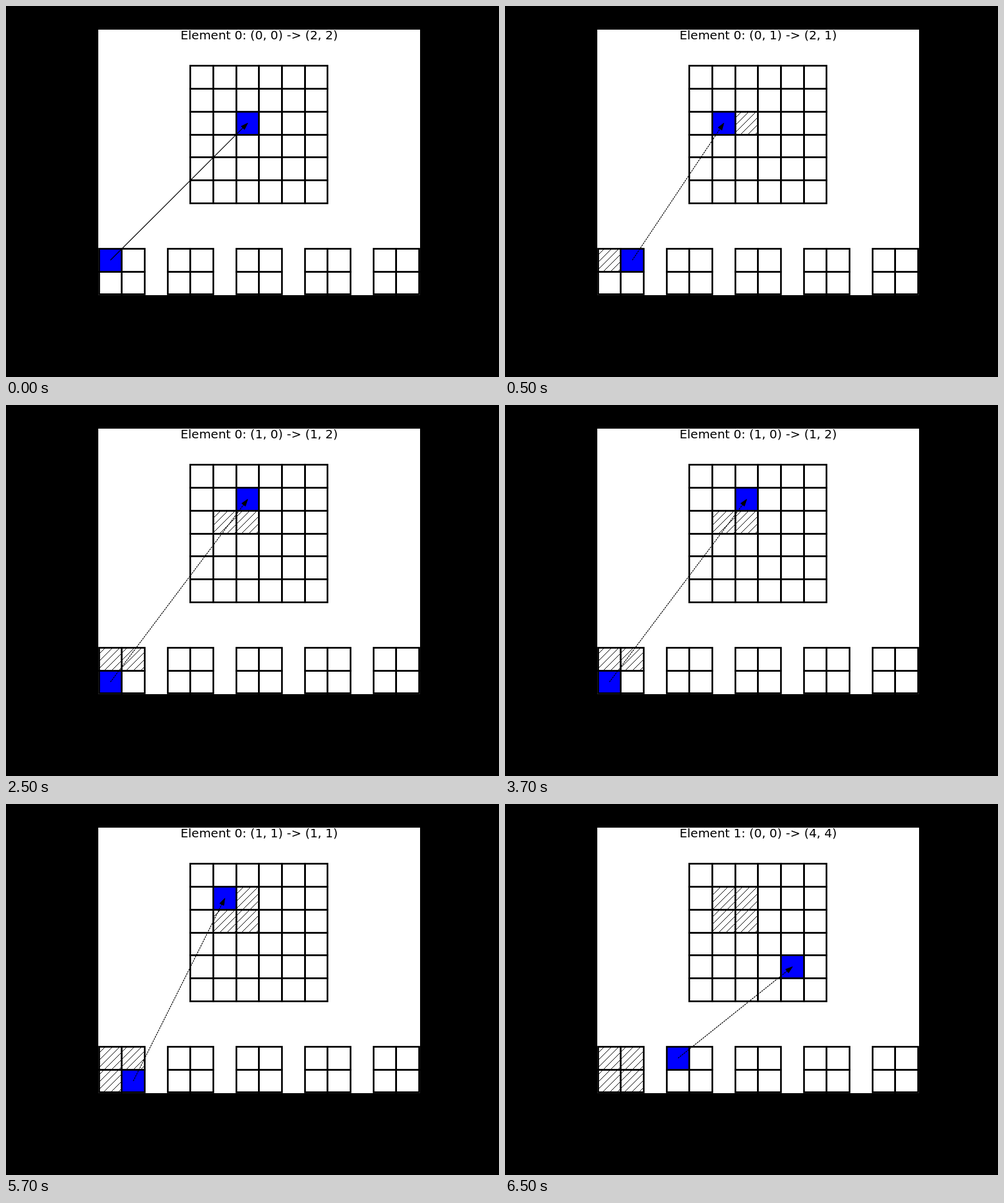
Recreate the animation shown at these times as an HTML page. Size 812 px wide and 612 px high, loop 8000 ms.

```html
<!DOCTYPE html>
<html lang="en">
<head>
<meta charset="utf-8">
<title>Element assembly</title>
<style>
  html, body { margin: 0; width: 100%; height: 100%; overflow: hidden; background: #000; }
  svg { display: block; width: 812px; height: 612px; }
  text { font: 20px "DejaVu Sans", sans-serif; text-anchor: middle; }
</style>
</head>
<body>
<svg viewBox="0 0 812 612">
  <defs>
    <pattern id="hatch" width="12" height="12" patternUnits="userSpaceOnUse">
      <path d="M-3 3L3 -3M-3 15L15 -3M9 15L15 9" stroke="#000" stroke-width="1"/>
    </pattern>
  </defs>
  <rect x="152" y="39" width="530" height="438" fill="#fff"/>
  <g id="cells" stroke="#000" stroke-width="2.78"></g>
  <path id="shaft" fill="none" stroke="#000" stroke-width="1.25"/>
  <path id="head" stroke="#000" stroke-width="1"/>
  <text id="title" x="417" y="55"></text>
</svg>
<script>
const LOOP = 8000, PITCH = 37.68, LEFT = 152.65, TOP = 98.49;
const $ = id => document.getElementById(id);

// Each step moves local cell (row, col) of an element to a global cell.
const steps = [
  { at: 0, el: 0, from: [0, 0], to: [2, 2] },
  { at: 500, el: 0, from: [0, 1], to: [2, 1] },
  { at: 2500, el: 0, from: [1, 0], to: [1, 2] },
  { at: 4500, el: 0, from: [1, 1], to: [1, 1] },
  { at: 6500, el: 1, from: [0, 0], to: [4, 4] }
];

const px = col => LEFT + PITCH * col;
const py = row => TOP + PITCH * row;
const snap = v => Math.round(v) + 0.5;
const cells = {};

function addGrid(row, col, size) {
  for (let r = row; r < row + size; r++) {
    for (let c = col; c < col + size; c++) {
      const x = snap(px(c)), y = snap(py(r));
      const cell = document.createElementNS("http://www.w3.org/2000/svg", "rect");
      cell.setAttribute("x", x);
      cell.setAttribute("y", y);
      cell.setAttribute("width", snap(px(c + 1)) - x);
      cell.setAttribute("height", snap(py(r + 1)) - y);
      $("cells").append(cell);
      cells[[r, c]] = cell;
    }
  }
}

addGrid(0, 4, 6);
for (let i = 0; i < 5; i++) addGrid(8, 3 * i, 2);

const source = s => [8 + s.from[0], 3 * s.el + s.from[1]];
const target = s => [s.to[0], 4 + s.to[1]];
const center = ([r, c]) => [px(c + 0.5) + 0.5, py(r + 0.5) + 0.5];

function paint(step, fill) {
  for (const key of [source(step), target(step)]) cells[key].setAttribute("fill", fill);
}

function drawArrow(step) {
  const [x1, y1] = center(source(step)), [x2, y2] = center(target(step));
  const len = Math.hypot(x2 - x1, y2 - y1);
  const ux = (x2 - x1) / len, uy = (y2 - y1) / len;
  const bx = x2 - ux * 11.3, by = y2 - uy * 11.3, w = 3.8;
  $("shaft").setAttribute("d", `M${x1} ${y1}L${bx} ${by}`);
  const diagonal = Math.abs(Math.abs(ux) - Math.abs(uy)) < 0.01;
  $("shaft").setAttribute("stroke-dasharray", diagonal ? "none" : "2.8 1.2");
  $("head").setAttribute("d",
    `M${x2} ${y2}L${bx - uy * w} ${by + ux * w}L${bx + uy * w} ${by - ux * w}Z`);
}

let shown = -1;

function render(time) {
  const t = time % LOOP;
  const now = steps.filter(s => s.at <= t).length - 1;
  if (now !== shown) {
    shown = now;
    for (const key in cells) cells[key].setAttribute("fill", "none");
    steps.slice(0, now).forEach(s => paint(s, "url(#hatch)"));
    const step = steps[now];
    paint(step, "#00f");
    drawArrow(step);
    $("title").textContent =
      `Element ${step.el}: (${step.from.join(", ")}) -> (${step.to.join(", ")})`;
  }
}

const start = performance.now();
function tick() {
  render(performance.now() - start);
  requestAnimationFrame(tick);
}
tick();
</script>
</body>
</html>
```
